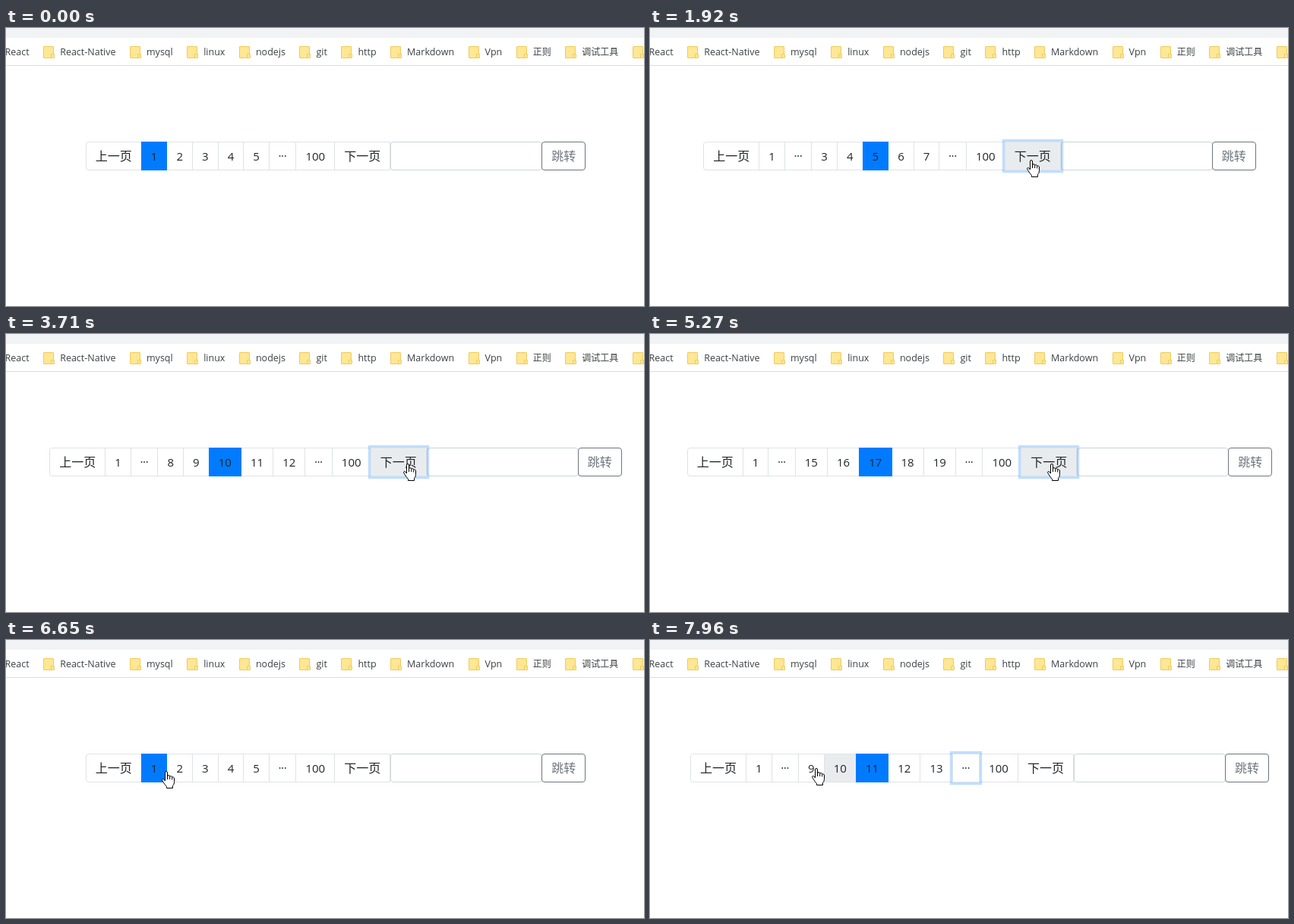
An HTML page for the animation above (8 s loop, 840 px wide and 367 px high).

```html
<!DOCTYPE html>
<html lang="zh">
<head>
<meta charset="utf-8">
<style>
html, body { margin: 0; width: 100%; height: 100%; overflow: hidden; background: #fff; }
body { position: relative; font-family: "Open Sans", "Noto Sans CJK SC", "Noto Sans CJK", sans-serif; color: #212529; }
* { box-sizing: border-box; white-space: nowrap; }
#tabs { position: absolute; left: 0; top: 0; width: 100%; height: 13px; background: #f1f3f4; }
#marks { position: absolute; left: 0; top: 13px; width: 100%; height: 37px; border-bottom: 1px solid #dadce0; overflow: hidden; }
#marks div { position: absolute; left: -23.4px; top: 9px; display: flex; font-size: 12.5px; line-height: 20px; color: #3c4043; }
#marks span { position: relative; padding: 0 18.5px 0 22px; }
#marks .cjk { font-size: 12px; }
#marks span::before, #marks span::after { content: ""; position: absolute; background: #ffe793; border: 1px solid #efcb5c; border-radius: 1px; }
#marks span::before { left: 0; top: 2px; width: 12px; height: 14px; }
#marks span::after { left: 10px; top: 12px; width: 3px; height: 4px; }
#pager div { position: absolute; top: 150px; height: 38px; border: 1px solid #dee2e6; background: #fff; font-size: 15px; line-height: 36px; text-align: center; }
#pager .word { font-size: 16px; }
#pager .dots { font-size: 13px; font-weight: 600; }
#pager .first { border-radius: 4px 0 0 4px; }
#pager .hover { background: #e9ecef; z-index: 1; }
#pager .active { background: #007bff; border-color: #007bff; z-index: 2; }
#pager .focus { z-index: 3; box-shadow: 0 0 0 3.2px rgba(0, 123, 255, .25); }
#pager .input { border-color: #ced4da; border-radius: 4px; }
#pager .go { border-color: #6c757d; border-radius: 4px; color: #6c757d; }
#cursor { position: absolute; left: 0; top: 0; z-index: 9; overflow: visible; }
</style>
</head>
<body>
<div id="tabs"></div>
<div id="marks"><div></div></div>
<div id="pager"></div>
<svg id="cursor" width="18" height="25" fill="#fff" stroke="#000" stroke-linejoin="round">
  <path id="hand" d="M-1.5 13V2Q-1.5.5 0 .5Q1.5.5 1.5 2V7Q1.8 5.6 3 5.6Q4.5 5.6 4.7 7.4Q5 6.6 6.2 6.6Q7.5 6.8 7.7 8.4Q8.2 7.6 9.2 8Q10.5 8.4 10.5 10V14.5Q10.5 17.5 8.5 19.5V22.5H.5V20.5Q-2 18-4 14.5Q-5.7 12.1-5.4 11.1Q-4.5 9.8-3 11.1ZM1.5 7V11M4.7 7.5V11M7.7 8.5V11.5"/>
  <path id="arrow" d="M.5.5V16.5L4.2 13L6.7 18.6L9 17.6L6.6 12.2H11.5Z"/>
</svg>
<script>
const $ = id => document.getElementById(id);
const LOOP = 8000, CENTER = 434, STEP = 77;

const marks = ["React", "React-Native", "mysql", "linux", "nodejs", "git", "http", "Markdown", "Vpn", "正则", "调试工具", ""];
$("marks").firstChild.innerHTML = marks.map(s => `<span class="${s > "z" ? "cjk" : ""}">${s}</span>`).join("");

// Clicks on "next", then on page 1, then on the dots
const nextClicks = [760, 1220, 1450, 1770, 2410, 2790, 3020, 3250, 3480, 3940, 4110, 4260, 4730, 4960, 5190, 5270];
const FIRST_CLICK = 6190, dotClicks = [7420, 7650];
const count = (list, t) => list.filter(c => c <= t).length;
const pageAt = t => 1 + (t < FIRST_CLICK ? count(nextClicks, t) : 5 * count(dotClicks, t));

// Pointer moves: start time, end time, place reached, downward bow
const ENTRY = [617, 312];
const moves = [
  [150, 690, 479, 169],
  [1850, 2000, 511, 176],
  [2090, 2240, 520, 172],
  [3640, 3710, 529, 171],
  [5430, 5960, 141, 169],
  [6270, 6650, 211, 173],
  [6650, 7270, 363, 174],
  [7430, 7580, 398, 176],
  [7650, 7960, 219, 169, 20]
];

function pointer(t) {
  const i = moves.filter(m => m[0] <= t).length - 1;
  if (i < 0) return null;
  const [a, b, x, y, bow = 0] = moves[i];
  const [x0, y0] = i ? moves[i - 1].slice(2) : ENTRY;
  const u = Math.min(1, Math.floor((t - a) / STEP + .1) / Math.round((b - a) / STEP));
  const p = 1 - (1 - u) ** 1.8;
  return [Math.round(x0 + (x - x0) * p), Math.round(y0 + (y - y0) * p + bow * Math.sin(Math.PI * p))];
}

function cell(text) {
  if (text === "···") return { text, kind: "dots", w: 36.4 };
  if (typeof text === "number") return { text, kind: "num", w: 26 + 8.625 * String(text).length };
  return { text, kind: "word", w: 74 };
}

function layout(page) {
  const nums = page < 5 ? [1, 2, 3, 4, 5] : [1, "···", ...[-2, -1, 0, 1, 2].map(d => page + d)];
  const cells = ["上一页", ...nums, "···", 100, "下一页"].map(cell);
  cells[0].kind += " first";
  const links = cells.reduce((sum, c) => sum + c.w - 1, 1);
  let x = CENTER - (links + 199 + 58) / 2;
  for (const c of cells) { c.x = x; x += c.w - 1; }
  return cells.concat({ text: "", kind: "input", x: x + 1, w: 200 },
    { text: "跳转", kind: "word go", x: x + 200, w: 58 });
}

let shown = "";
function draw(t) {
  const page = pageAt(t), cells = layout(page), links = cells.length - 2;
  const at = pointer(t), prev = pointer(t - STEP);
  // Hover trails the pointer by one step
  const over = prev && prev[1] >= 150 && prev[1] < 188
    ? cells.findIndex((c, i) => i < links && prev[0] >= c.x && prev[0] < c.x + c.w - 1) : -1;
  const focus = t >= dotClicks[0] ? links - 3 : t >= nextClicks[0] && t < FIRST_CLICK ? links - 1 : -1;

  const html = cells.map((c, i) => {
    const cls = [c.kind, c.text === page && "active", i === over && "hover", i === focus && "focus"];
    return `<div class="${cls.filter(Boolean).join(" ")}" style="left:${c.x}px;width:${c.w}px">${c.text}</div>`;
  }).join("");
  if (html !== shown) $("pager").innerHTML = shown = html;

  $("cursor").style.display = at ? "" : "none";
  if (!at) return;
  $("cursor").style.transform = `translate(${at[0]}px,${at[1]}px)`;
  $("hand").style.display = at[1] < 188 ? "" : "none";
  $("arrow").style.display = at[1] < 188 ? "none" : "";
}

const start = performance.now();
function tick() {
  draw((performance.now() - start) % LOOP);
  requestAnimationFrame(tick);
}
tick();
</script>
</body>
</html>
```
